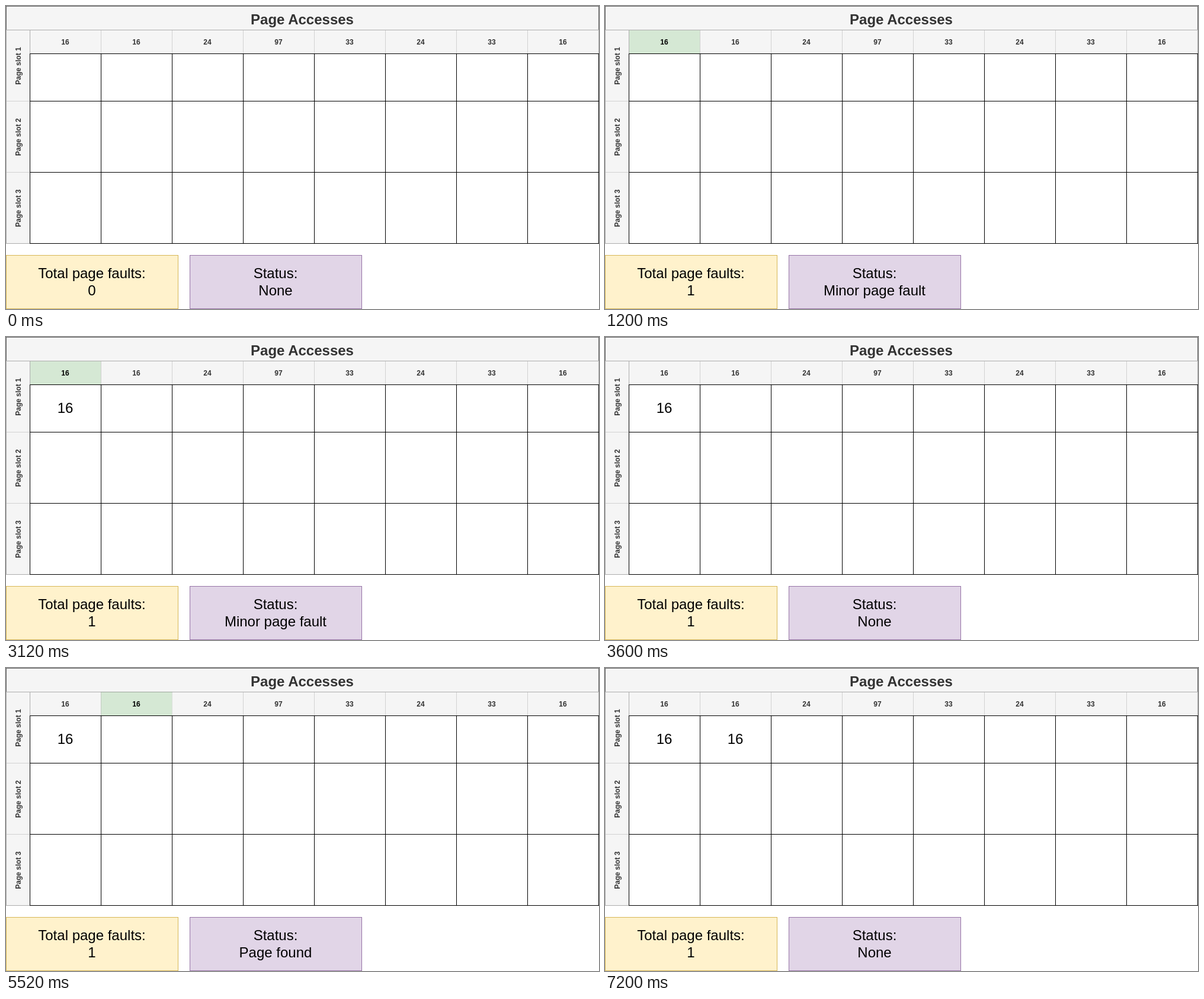
These frames come from a looping animation (1001x511 px, 8 s). An HTML page:

```html
<!DOCTYPE html>
<html lang="en">
<head>
<meta charset="utf-8">
<title>Page Accesses</title>
<style>
  html, body { margin: 0; width: 100%; height: 100%; overflow: hidden; background: #fff; }
  svg { display: block; font-family: "Liberation Sans", Arial, Helvetica, sans-serif; }
  text { text-anchor: middle; }
</style>
</head>
<body>
<svg id="stage" width="1001" height="511" viewBox="0 0 1001 511"></svg>
<script>
const STEP = 1200, LOOP = 8000;
const pages = [16, 16, 24, 97, 33, 24, 33, 16];
// active: highlighted access, filled: accesses already stored in slot 1
const steps = [
  { active: -1, filled: 0, faults: 0, status: "None" },
  { active: 0, filled: 0, faults: 1, status: "Minor page fault" },
  { active: 0, filled: 1, faults: 1, status: "Minor page fault" },
  { active: -1, filled: 1, faults: 1, status: "None" },
  { active: 1, filled: 1, faults: 1, status: "Page found" },
  { active: 1, filled: 2, faults: 1, status: "Page found" },
  { active: -1, filled: 2, faults: 1, status: "None" }
];
const GREY = "#f5f5f5", EDGE = "#666", SOFT = "#adadad", FAINT = "#d1d1d1", INK = "#333";

const rect = (x, y, w, h, fill) =>
  `<rect x="${x}" y="${y}" width="${w}" height="${h}" fill="${fill}"/>`;
const hLine = (x1, x2, y, color) => rect(x1, y, x2 - x1 + 1, 1, color);
const vLine = (x, y1, y2, color) => rect(x, y1, 1, y2 - y1 + 1, color);
const label = (x, y, s, size = 24, fill = "#000", extra = "") =>
  `<text x="${x}" y="${y}" font-size="${size}" fill="${fill}" ${extra}>${s}</text>`;
const bold = 'font-weight="700"';

function box(x, fill, stroke, title, value) {
  return rect(x, 420, 291, 91, stroke) + rect(x + 1, 421, 289, 89, fill) +
    label(x + 145, 459, title) + label(x + 145, 488, value);
}

function header(active) {
  let out = rect(0, 0, 1001, 80, GREY) + rect(0, 80, 40, 320, GREY) +
    hLine(0, 1000, 0, EDGE) + vLine(0, 0, 40, EDGE) + vLine(1000, 0, 40, EDGE) +
    hLine(0, 1000, 40, SOFT) + vLine(0, 41, 400, SOFT) + vLine(1000, 41, 80, SOFT) +
    vLine(40, 41, 80, SOFT) + hLine(0, 40, 400, SOFT);
  for (let i = 1; i < 8; i++) out += vLine(40 + 120 * i, 41, 80, FAINT);
  if (active >= 0) {
    const x = 40 + 120 * active;
    out += rect(x + 1, 41, 119, 39, "#d5e8d4");
    if (active) out += hLine(x, x + 120, 40, "#9da79d") +
      vLine(x, 41, 80, "#c1cac0") + vLine(x + 120, 41, 80, "#dbdfda");
  }
  out += label(500, 31, "Page Accesses", 24, INK, bold);
  pages.forEach((p, i) => {
    out += label(100 + 120 * i, 65, p, 12, i === active ? "#000" : INK, bold);
  });
  return out;
}

function grid() {
  let out = "";
  for (let i = 0; i < 3; i++) {
    const y = 101 + 120 * i;
    out += label(25, y, `Page slot ${i + 1}`, 12, INK, `${bold} transform="rotate(-90 25 ${y})"`);
    if (i) out += hLine(1, 39, 40 + 120 * i, FAINT);
  }
  for (const y of [80, 160, 280, 400]) out += hLine(40, 1000, y, "#000");
  for (let i = 0; i <= 8; i++) out += vLine(40 + 120 * i, 80, 400, "#000");
  return out;
}

function draw({ active, filled, faults, status }) {
  stage.innerHTML = header(active) + grid() +
    pages.slice(0, filled).map((p, i) => label(100 + 120 * i, 128, p)).join("") +
    box(0, "#fff2cc", "#d6b656", "Total page faults:", faults) +
    box(310, "#e1d5e7", "#9673a6", "Status:", status);
}

const stage = document.getElementById("stage");
const start = performance.now();
let shown = -1;
function tick() {
  const step = Math.floor((performance.now() - start) % LOOP / STEP);
  if (step !== shown) draw(steps[shown = step]);
  requestAnimationFrame(tick);
}
tick();
</script>
</body>
</html>
```
